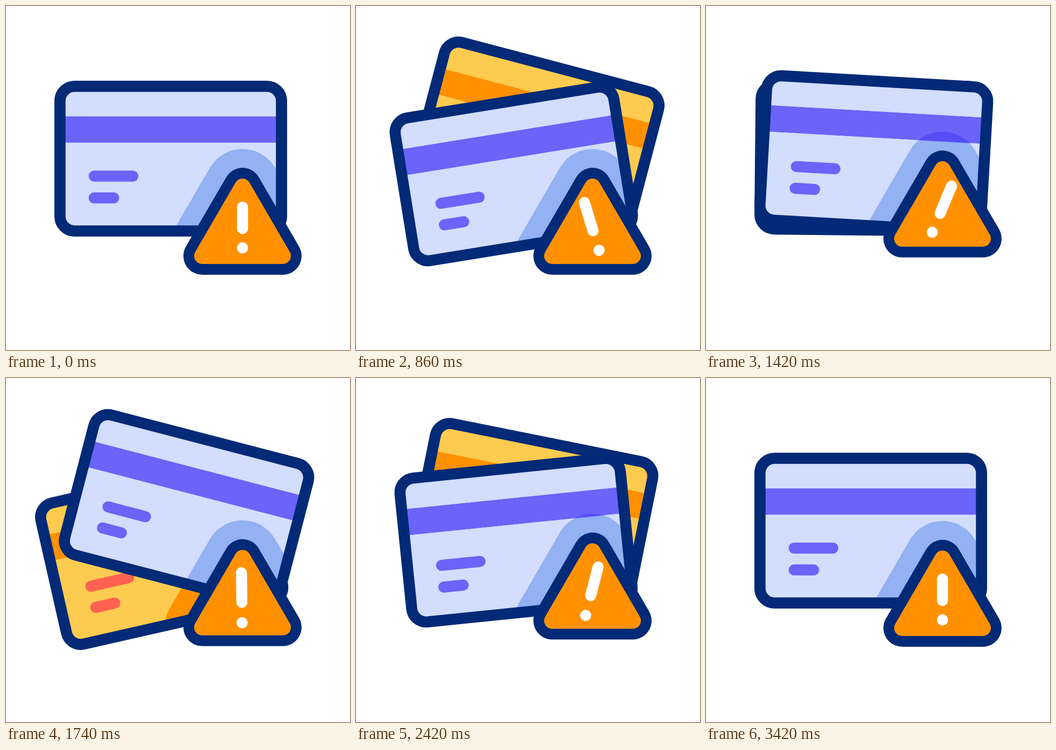
Write an HTML page with a canvas that moves like this. It is 640 px wide and 640 px high and loops after 3.6 s.

```html
<!DOCTYPE html>
<html lang="en">
<head>
<meta charset="utf-8">
<title>Card warning</title>
<style>
  html, body { margin: 0; height: 100%; overflow: hidden; background: #fff; }
  canvas { display: block; width: 100vw; height: 100vh; }
</style>
</head>
<body>
<canvas id="stage" width="640" height="640"></canvas>
<script>
const ctx = document.getElementById('stage').getContext('2d');
const LOOP = 3600;
const NAVY = '#032a76', ORANGE = '#ff9100';
const BLUE_CARD = { face: '#d3ddfd', stripe: '#6a64f8', lines: '#6a64f8', shade: '#93b1f3', stripeShade: '#564ef4' };
const GOLD_CARD = { face: '#fdcb50', stripe: ORANGE, lines: '#ff6250', shade: ORANGE, stripeShade: ORANGE };
const PIVOT = [477, 379];

// Keys are [time in ms, value]
const blueTurn = [[200, 0], [1000, -10.5], [1800, 15.5], [2600, -10.5], [3400, 0]];
const goldTurn = [[200, 0], [1000, 16.9], [1800, -13.9], [2600, 16.9], [3400, 0]];
const hop = [[200, 0], [530, -36], [860, 0], [1315, -39.5], [1770, 0], [2185, -32], [2600, 0], [3000, -35], [3400, 0]];
const markTurn = [[200, 0], [440, 24], [960, -24], [1490, 27], [2000, -30], [2540, 24], [3070, -24], [3400, 0]];
const markStretch = [[200, 0], [440, 1], [3070, 1], [3400, 0]];

// cubic-bezier(1/6, 0, 5/6, 1)
function ease(x) {
  let low = 0, high = 1;
  for (let i = 0; i < 20; i++) {
    const s = (low + high) / 2;
    if (s * (0.5 + s * (1.5 - s)) < x) low = s; else high = s;
  }
  return low * low * (3 - 2 * low);
}

const mix = (a, b, k) => a + (b - a) * k;

function valueAt(keys, t) {
  const next = keys.findIndex(key => key[0] > t);
  if (next === 0) return keys[0][1];
  if (next < 0) return keys[keys.length - 1][1];
  const [t0, a] = keys[next - 1], [t1, b] = keys[next];
  return mix(a, b, ease((t - t0) / (t1 - t0)));
}

function turn(degrees, x, y) {
  ctx.translate(x, y);
  ctx.rotate(degrees * Math.PI / 180);
  ctx.translate(-x, -y);
}

function line(x1, y1, x2, y2, width, color) {
  ctx.beginPath();
  ctx.moveTo(x1, y1);
  ctx.lineTo(x2, y2);
  ctx.lineWidth = width;
  ctx.strokeStyle = color;
  ctx.stroke();
}

// Triangle grown outward by a rounded margin
function triangle(y, margin, color) {
  ctx.beginPath();
  ctx.moveTo(440, 336 + y);
  ctx.lineTo(515, 465 + y);
  ctx.lineTo(365, 465 + y);
  ctx.closePath();
  ctx.lineWidth = margin * 2;
  ctx.fillStyle = ctx.strokeStyle = color;
  ctx.fill();
  ctx.stroke();
}

function card(angle, y, colors) {
  const outline = new Path2D(), stripe = new Path2D();
  outline.roundRect(100.5, 149.5, 412, 269, 27);
  stripe.rect(100, 205.3, 413, 49.2);
  const shade = color => {
    ctx.save();
    turn(-angle, ...PIVOT);
    triangle(y, 70, color);
    ctx.restore();
  };

  ctx.save();
  turn(angle, ...PIVOT);
  ctx.save();
  ctx.clip(outline);
  ctx.fillStyle = colors.face;
  ctx.fill(outline);
  shade(colors.shade);
  line(164, 316.5, 236, 316.5, 20.6, colors.lines);
  line(164, 357, 200.3, 357, 20.6, colors.lines);
  ctx.clip(stripe);
  ctx.fillStyle = colors.stripe;
  ctx.fill(stripe);
  shade(colors.stripeShade);
  ctx.restore();
  ctx.lineWidth = 20.6;
  ctx.strokeStyle = NAVY;
  ctx.stroke(outline);
  ctx.restore();
}

function exclamation(t, y) {
  const k = valueAt(markStretch, t);
  ctx.save();
  ctx.translate(mix(440, 438.7, k), mix(412, 410.5, k) + y);
  ctx.rotate(valueAt(markTurn, t) * Math.PI / 180);
  line(0, mix(-38, -47, k), 0, mix(2, 8, k), 20.6, '#fff');
  ctx.beginPath();
  ctx.arc(0, mix(38, 46, k), 10.4, 0, Math.PI * 2);
  ctx.fillStyle = '#fff';
  ctx.fill();
  ctx.restore();
}

function draw(now) {
  const t = now % LOOP, y = valueAt(hop, t);
  ctx.fillStyle = '#fff';
  ctx.fillRect(0, 0, 640, 640);
  card(valueAt(goldTurn, t), y, GOLD_CARD);
  card(valueAt(blueTurn, t), y, BLUE_CARD);
  triangle(y, 35, NAVY);
  triangle(y, 15, ORANGE);
  exclamation(t, y);
}

ctx.lineCap = ctx.lineJoin = 'round';
let start;
function tick(now) {
  start ??= now;
  draw(Math.max(0, now - start));
  requestAnimationFrame(tick);
}
draw(0);
requestAnimationFrame(tick);
</script>
</body>
</html>
```
